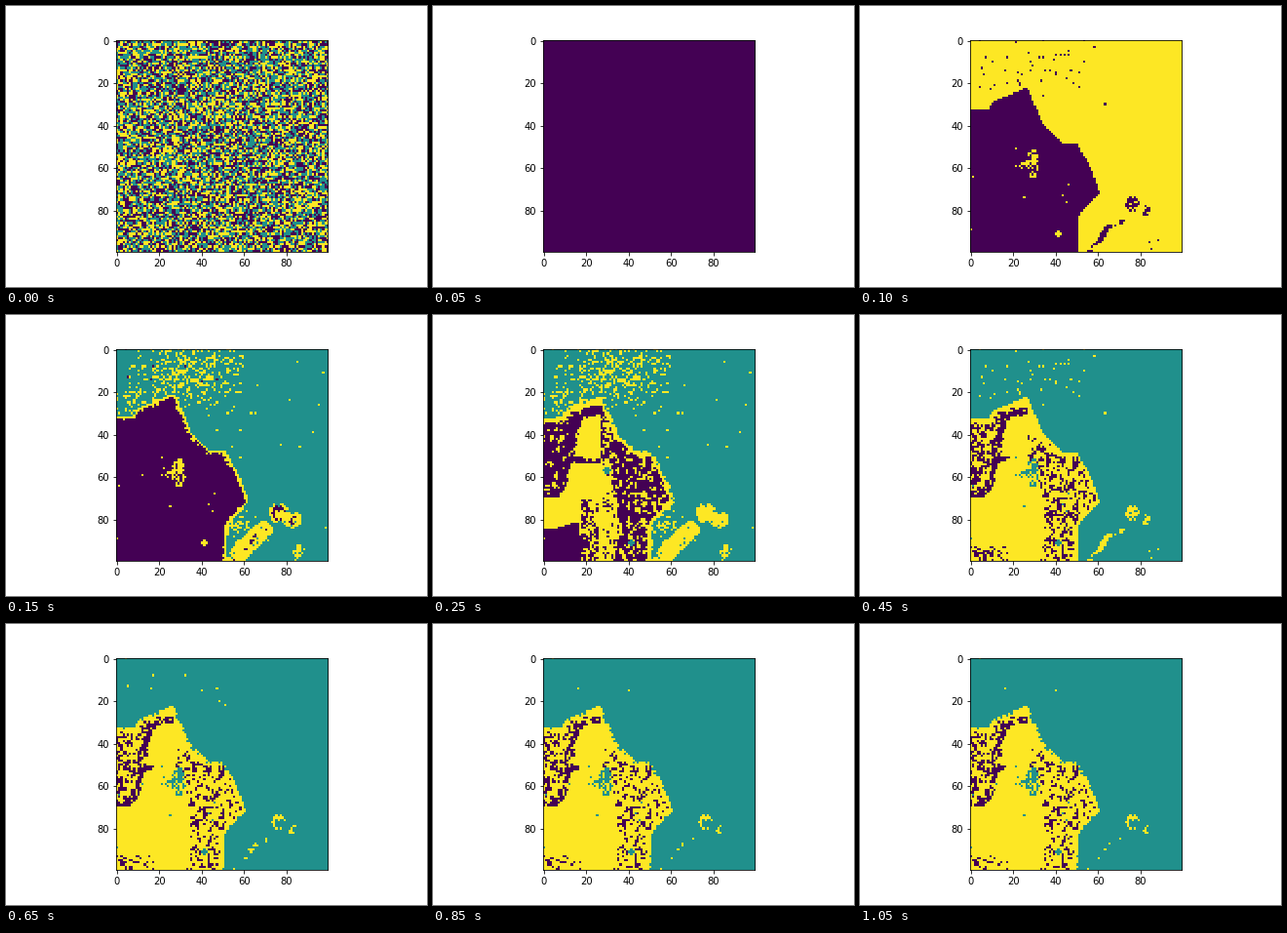
These frames come from a looping animation (432 px wide and 288 px high, 1.15 s). A matplotlib script:

```python
import numpy as np
import matplotlib.pyplot as plt
from matplotlib.animation import FuncAnimation
from matplotlib.path import Path

N, STEPS = 100, 23
rng = np.random.default_rng(11)
Y, X = np.mgrid[:N, :N]
CELLS = np.column_stack([X.ravel(), Y.ravel()])


def inside(*pts):
    return Path(pts).contains_points(CELLS).reshape(N, N)


def near(width, *pts):
    """Cells no further than width from a polyline."""
    hit = np.zeros((N, N), bool)
    for (ax, ay), (bx, by) in zip(pts, pts[1:]):
        dx, dy = bx - ax, by - ay
        t = ((X - ax) * dx + (Y - ay) * dy) / (dx * dx + dy * dy)
        t = np.clip(t, 0, 1)
        hit |= np.hypot(X - ax - t * dx, Y - ay - t * dy) <= width
    return hit


def spread(cx, cy, rx, ry):
    return ((X - cx) / rx) ** 2 + ((Y - cy) / ry) ** 2


def bump(*oval):
    return np.exp(-spread(*oval))


def make_grain():
    """Evenly distributed noise in which neighbours clump a little."""
    r = rng.random((N, N))
    r += 0.4 * np.roll(r, 1, 0) + 0.25 * np.roll(r, 1, 1)
    return r.ravel().argsort().argsort().reshape(N, N) / N ** 2


def paint(mask, low, high, density=1.0):
    """Fill part of a mask with tones between low and high."""
    mask = mask & (rng.random((N, N)) < density)
    tone[mask] = low + (high - low) * grain[mask]


# Tone runs from dark (below 1) through middle (1 to 2) to light (above 3);
# the fraction decides when a cell moves to another cluster.
grain = make_grain()
tone = np.full((N, N), 5.0)

ridge = [(-2, 32.6), (7.5, 32.6), (11, 28.7), (21, 24.4), (26.5, 22.4),
         (34, 40), (42.5, 48.4), (50, 48.8), (57, 61.3), (60.5, 71.5),
         (51, 82), (50, 101)]
body = inside(*ridge, (-2, 101))

# speckled sky
sky = (0.38 * bump(28, 10, 13, 10) + 0.28 * bump(45, 10, 13, 14)
       + 0.3 * bump(6, 25, 11, 8))
paint(Y < 34, 2.2, 3.0, sky)
paint(Y < 34, 1.93, 2.24, 0.05 * bump(30, 11, 20, 11))
paint(X > 40, 2.4, 3.0, 0.002)

# lower right patches
paint(Y > 75, 2.3, 3.0, 0.5 * bump(58, 84, 7, 6))
paint(near(4.2, (56, 98), (61, 92), (69, 85)), 2.25, 3.0, 0.95)
paint(near(1.3, (56, 99), (60, 95), (64, 88)), 1.95, 2.26)
paint(near(0.8, (64, 88), (72, 85)), 1.97, 2.26, 0.8)
for cx, cy, r in [(76, 77, 3.2), (82.5, 80, 2.6)]:
    paint(spread(cx, cy, r + 1.5, r + 1.5) < 1, 2.3, 3.0, 0.8)
    paint(spread(cx, cy, r, r) < 1, 1.75, 2.3, 0.75)
paint(Y > 88, 2.0, 3.0, 0.8 * bump(85, 95, 2, 4))

# body and its rim
paint(near(1.3, *ridge), 2.2, 4.0)
tone[body] = 1.5

# left slope
paint(inside((-1, 34), (8, 34), (13, 30), (26, 25.5), (27, 30), (18, 33),
             (13, 53), (7, 69.5), (-1, 69.5)), -0.75, 1.35)
paint(near(1.3, (25, 28.5), (15.5, 32), (12.5, 44)), -0.5, 0.1, 0.85)
paint(near(1.5, (11.5, 52), (10, 61), (7, 67), (0, 68)), -0.5, 0.1, 0.85)
paint(near(0.8, (11, 51.5), (18, 51.5)), -0.5, 0.2, 0.8)
paint(near(0.9, (15, 53), (28, 52)), 0.2, 0.95, 0.8)

# foot
foot = inside((-1, 84.5), (5, 84.5), (16, 81), (19, 101), (-1, 101))
paint(foot, 0.28, 0.99)
paint(foot & (Y > 92), -0.2, 0.4, 0.5)
paint(inside((18, 70), (26, 72), (25, 101), (18, 101)), 0.28, 1.7)

# right slope
paint(inside((27, 26), (33, 42), (33, 60), (27, 52)), 0.1, 1.4)
paint(inside((27, 41), (34, 42), (43, 50), (50, 51), (57, 65), (58.5, 71),
             (49, 82), (48, 101), (33, 101), (35, 72), (28, 54)),
      -0.45, 1.55)
paint(inside((28, 62), (34, 62), (34, 101), (28, 101)), 0.4, 1.9, 0.35)
paint(near(1.2, (37, 74), (38, 86), (34, 99)), -0.6, 0.6, 0.6)

# rim and light gaps
paint(body & near(0.9, *ridge), 1.7, 2.2)
paint((spread(29, 58, 3.4, 7) < 1) | (spread(23, 58, 3, 2.5) < 1),
      1.8, 2.6, 0.7)
paint(spread(29.5, 57, 1.6, 2) < 1, 3.1, 3.5)
paint(spread(41, 91, 1.2, 1.6) < 1, 3.1, 3.5)
paint(body, 2.1, 2.6, 0.003 + 0.4 * bump(44, 74, 1.5, 2))

start = rng.integers(0, 3, (N, N))


def labels(step):
    if step == 0:
        return start
    if step == 1:
        return np.zeros((N, N), int)
    if step == 2:
        return np.where(tone < 2.24, 0, 2)
    shift = 0.7 ** (min(step, STEPS - 2) - 5)
    return np.where(tone < shift, 0, np.where(tone < 2 + shift, 2, 1))


fig, ax = plt.subplots(figsize=(6, 4), dpi=72)
fig.subplots_adjust(left=0.125, right=0.9, bottom=0.125, top=0.88)
img = ax.imshow(start, cmap="viridis", vmin=0, vmax=2,
                interpolation="nearest")
ax.set_xticks(range(0, N, 20))
ax.set_yticks(range(0, N, 20))


def update(step):
    img.set_data(labels(step))
    return [img]


anim = FuncAnimation(fig, update, frames=STEPS, interval=50,
                     repeat=True, repeat_delay=0)
plt.show()
```
